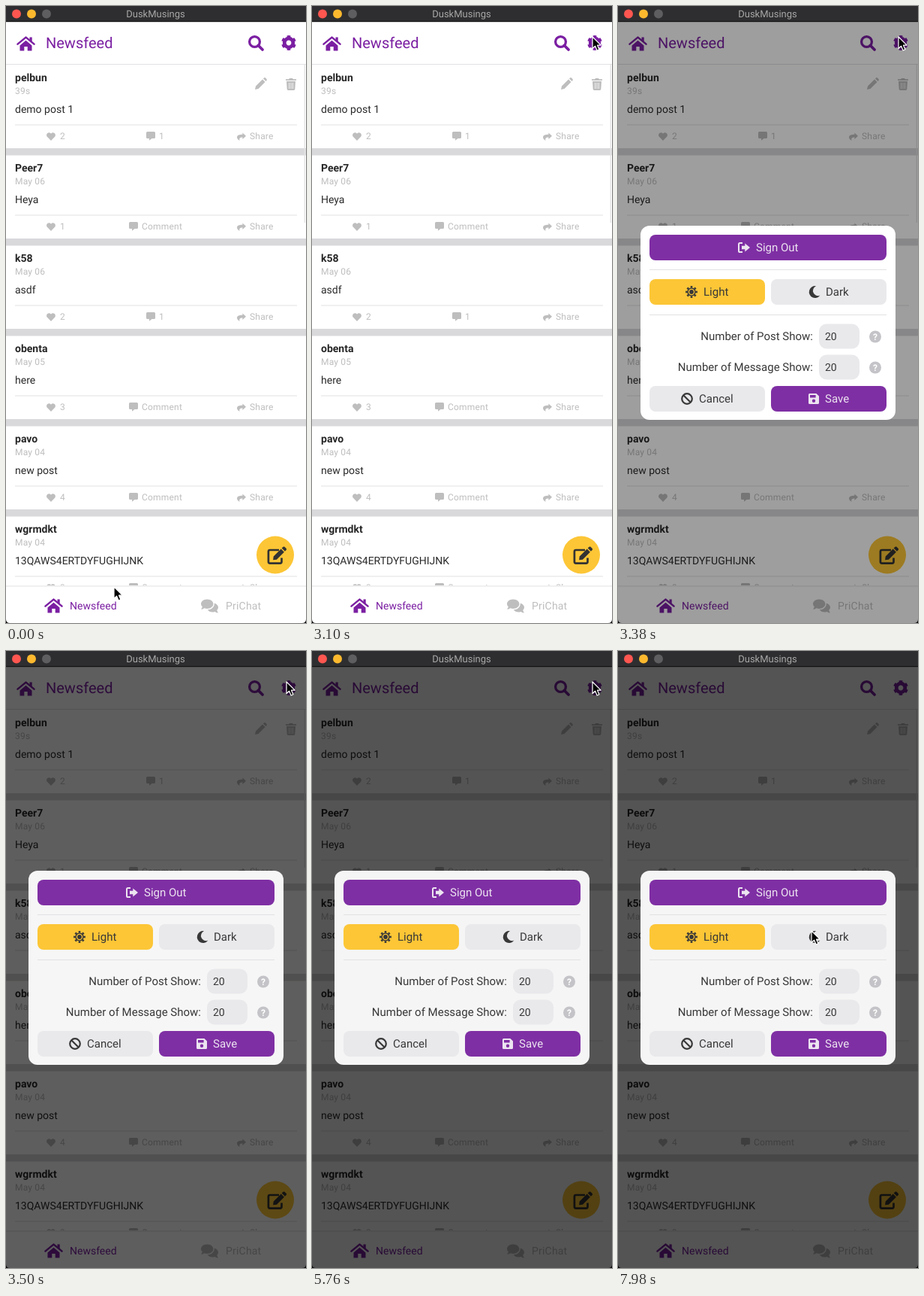
Animation of 400x820 px, one loop 8000 ms. Source, as an HTML page:

```html
<!DOCTYPE html>
<html lang="en">
<head>
<meta charset="utf-8">
<title>Newsfeed</title>
<style>
  html, body { margin: 0; width: 100%; height: 100%; overflow: hidden; background: #000; }
  svg { display: block; font-family: Roboto, sans-serif; }
  text { white-space: pre; text-rendering: geometricPrecision; }
  .line { stroke: #e2e2e4; stroke-width: 1.2; }
  .faint { fill: #bebebe; color: #bebebe; font-size: 12px; letter-spacing: .2px; }
  .body { fill: #2a2a2a; font-size: 14px; }
  .name { fill: #262626; font-size: 14px; font-weight: 700; }
  .accent { fill: #7b1fa2; color: #7b1fa2; }
  .dialog { font-size: 15px; fill: #383838; color: #383838; }
  .light { fill: #ece4f0; color: #ece4f0; }
</style>
</head>
<body>
<svg id="stage" width="400" height="820" viewBox="0 0 400 820"></svg>
<script>
const LOOP = 8000;
const PURPLE = '#7f2fa4', AMBER = '#fcc636', BUTTON = '#e9e9ec';

// Icons are drawn around or from their own origin; currentColor is used for strokes.
const stroke = (d, w, extra = '') =>
  `<path d="${d}" fill="none" stroke="currentColor" stroke-width="${w}" ${extra}/>`;
const ring = (r, w, extra = '') =>
  `<circle r="${r}" fill="none" stroke="currentColor" stroke-width="${w}" ${extra}/>`;
const teeth = (n, r, w, turn = 0) =>
  ring(r, w, `pathLength="${2 * n}" stroke-dasharray="1 1" stroke-dashoffset=".5" transform="rotate(${turn})"`);

const icons = {
  home: stroke('M1 10.6 12 1.6 23 10.6', 2.5, 'stroke-linejoin="round" stroke-linecap="round"') +
    '<path d="M17 1.6h3.2v6L17 5zM4 12.4 12 5.8 20 12.4V19.6H14.2V14H9.8V19.6H4Z"/>',
  search: ring(6.9, 3.3) + stroke('M5 5 10.5 10.5', 3.8, 'stroke-linecap="round"'),
  gear: ring(5.8, 4.8) + teeth(6, 8.5, 2.9, 30),
  pencil: '<path d="M0 16 1 11.5 10 2.5 13.5 6 4.5 15ZM11 1.5 12 .5Q13 -.3 14 .6L15.4 2Q16.3 3 15.5 4L14.5 5Z"/>',
  trash: '<path d="M0 1.2H4.2L5 0H9L9.8 1.2H14V3H0ZM1 4H13L12.3 14.6Q12.2 16 10.8 16H3.2Q1.8 16 1.7 14.6Z"/>' +
    '<path d="M4.6 6V14M7 6V14M9.4 6V14" stroke="#fff" stroke-width=".8"/>',
  heart: '<path d="M6 11 .9 5.8C-.6 4 0 .9 2.6.4 4 .1 5.2.7 6 1.7 6.8.7 8 .1 9.4.4 12 .9 12.6 4 11.1 5.8Z"/>',
  bubble: '<path d="M1.5 0H10.5Q12 0 12 1.5V7.5Q12 9 10.5 9H7.5L4 11.8V9H1.5Q0 9 0 7.5V1.5Q0 0 1.5 0Z"/>',
  share: '<path d="M7.4 0 12 4.2 7.4 8.4V6C4 6 2.6 7.2 3.6 10.6 1.4 9.5 0 7.8 0 6.1 0 3.2 3 2.4 7.4 2.3Z"/>',
  edit: stroke('M15.5 5H3.4Q1.4 5 1.4 7V20.6Q1.4 22.6 3.4 22.6H17Q19 22.6 19 20.6V15.5', 2.7) +
    '<path d="M7.6 18.2 8.2 13.6 18.2 3.6 22.4 7.8 12.4 17.8ZM19.2 2.6 21 .8Q22 0 23 .8L25.2 3Q26 4 25.2 5L23.4 6.8Z"/>',
  chats: '<path d="M8.2 0C12.8 0 16.4 2.8 16.4 6.2S12.8 12.4 8.2 12.4Q6.2 12.4 4.4 11.7 2.6 13.2 0 13.2 1.5 11.6 1.8 9.8 0 8.3 0 6.2C0 2.8 3.6 0 8.2 0Z"/>' +
    '<path d="M17.7 5.2C21 6 23 8.2 23 10.8Q23 13 21.3 14.6 21.6 16.4 23 18 20.4 18 18.6 16.5C14.6 18 10.4 16.6 8.6 13.8 14 13.8 18.4 10 17.7 5.2Z"/>',
  exit: stroke('M6 1H2.6Q1 1 1 2.6V11.4Q1 13 2.6 13H6', 2) +
    '<path d="M5 4.8H9.3V1.6L16 7 9.3 12.4V9.2H5Z"/>',
  sun: teeth(8, 6.7, 2.4) + ring(5, 1.6) + '<circle r="2.9"/>',
  moon: '<path d="M2 -7.8A8 8 0 1 0 7.4 4.6 6.6 6.6 0 0 1 2 -7.8Z"/>',
  ban: ring(6.8, 2.2) + stroke('M-4.8 -4.8 4.8 4.8', 2.2),
  disk: '<path fill-rule="evenodd" d="M1.5 0H10.4L14 3.6V12.5Q14 14 12.5 14H1.5Q0 14 0 12.5V1.5Q0 0 1.5 0ZM2 2V5.4H9.6V2ZM7 7.6A2.2 2.2 0 1 0 7 12 2.2 2.2 0 1 0 7 7.6Z"/>',
};

const icon = (name, x, y, cls = '') => `<g class="${cls}" transform="translate(${x} ${y})">${icons[name]}</g>`;
const text = (x, y, str, cls = '', attrs = '') => `<text x="${x}" y="${y}" class="${cls}" ${attrs}>${str}</text>`;
const rect = (x, y, w, h, fill, r = 0, attrs = '') =>
  `<rect x="${x}" y="${y}" width="${w}" height="${h}" rx="${r}" fill="${fill}" ${attrs}/>`;
const hline = (x1, x2, y) => `<path class="line" d="M${x1} ${y}H${x2}"/>`;

const posts = [
  ['pelbun', '39s', 'demo post 1', 2, 1],
  ['Peer7', 'May 06', 'Heya', 1],
  ['k58', 'May 06', 'asdf', 2, 1],
  ['obenta', 'May 05', 'here', 3],
  ['pavo', 'May 04', 'new post', 4],
  ['wgrmdkt', 'May 04', '13QAWS4ERTDYFUGHIJNK', 3],
];

function card([name, date, body, likes, comments], i) {
  const commentX = comments ? 187 : 164;
  return `<g transform="translate(0 ${78 + i * 120})">` +
    text(12, 22, name, 'name') + text(12, 39, date, 'faint') + text(12, 64, body, 'body') +
    hline(12, 388, 80) +
    `<g class="faint">` +
    icon('heart', 54, 90) + text(72, 99, likes) +
    icon('bubble', commentX, 89) + text(commentX + 17, 99, comments || 'Comment') +
    icon('share', 308, 90.5) + text(325, 99, 'Share') + '</g>' +
    rect(0, 111, 400, 9.5, '#d9d9dc') + '</g>';
}

const page =
  rect(0, 21, 400, 799, '#fff') +
  posts.map(card).join('') +
  icon('pencil', 332, 95, 'faint') + icon('trash', 373, 96, 'faint') +
  rect(397.6, 78, 1.4, 210, '#e4e4e4') +
  icon('home', 14.5, 40, 'accent') + text(53, 56, 'Newsfeed', 'accent', 'font-size="20"') +
  icon('search', 331.5, 47.5, 'accent') + icon('gear', 377, 49, 'accent') +
  hline(0, 400, 77.5) +
  `<circle cx="359" cy="729.5" r="25" fill="${AMBER}"/>` +
  `<g style="fill:#333;color:#333">${icon('edit', 348.5, 718)}</g>` +
  rect(0, 770, 400, 50, '#fff') + hline(0, 400, 771) +
  icon('home', 51.5, 787, 'accent') + text(85, 802, 'Newsfeed', 'accent', 'font-size="14"') +
  icon('chats', 260, 788.5, 'faint') + text(293, 802, 'PriChat', 'faint', 'style="font-size:14px"');

const field = (label, y) =>
  text(260, y + 5, label, '', 'text-anchor="end"') +
  rect(268, y - 16.5, 54, 33, BUTTON, 10) + text(276, y + 5, '20', '', 'font-size="14"') +
  `<circle cx="343" cy="${y + .5}" r="8" fill="#c4c4c8"/>` +
  text(343, y + 5, '?', '', 'text-anchor="middle" font-size="12" font-weight="700" style="fill:#fff"');

const dialog =
  rect(30, 292, 340, 258, '#f5f5f5', 12, 'id="panel"') +
  rect(42, 304, 316, 34, PURPLE, 8) +
  `<g class="light">${icon('exit', 160, 314)}${text(184, 326, 'Sign Out')}</g>` +
  hline(42, 358, 350.5) +
  rect(42, 363, 154, 34, AMBER, 8) + icon('sun', 98, 380) + text(114, 385, 'Light') +
  rect(204, 363, 154, 34, BUTTON, 8) + icon('moon', 262, 380) + text(277, 385, 'Dark') +
  hline(42, 358, 410.5) +
  field('Number of Post Show:', 439) + field('Number of Message Show:', 480) +
  rect(42, 505, 154, 34, BUTTON, 8) + icon('ban', 92, 522) + text(108, 527, 'Cancel') +
  rect(204, 505, 154, 34, PURPLE, 8) +
  `<g class="light">${icon('disk', 254, 515)}${text(276, 527, 'Save')}</g>`;

const titleBar =
  rect(0, 0, 400, 21, '#2e2e30') + rect(0, 20, 400, 1.2, '#121212') +
  [['#ff5650', 14], ['#fdb92e', 34], ['#5e5e60', 54]]
    .map(([c, x]) => `<circle cx="${x}" cy="10.5" r="6" fill="${c}"/>`).join('') +
  text(199.5, 15, 'DuskMusings', '', 'text-anchor="middle" font-size="13" fill="#a8a8a8"');

const corners = '<path d="M0 815V820H5Q0 820 0 815ZM400 815V820H395Q400 820 400 815Z"/>';
const pointer = '<path id="pointer" d="M0 0V15.5L3.6 12.2 6.1 18 8.9 16.8 6.5 11.2H11.2Z" ' +
  'fill="#000" stroke="#fff" stroke-width="1.2" stroke-linejoin="round"/>';

document.getElementById('stage').innerHTML =
  page + rect(0, 21, 400, 799, '#000', 0, 'id="shade"') + titleBar + corners +
  `<g id="dialog" class="dialog">${dialog}</g>` + pointer;

// Each step is [time in ms, value, easing]; the value holds before the first and after the last.
function play(id, property, steps) {
  const all = [[0, steps[0][1]], ...steps, [LOOP, steps.at(-1)[1]]];
  document.getElementById(id).animate(
    all.map(([t, value, easing = 'linear']) => ({ offset: t / LOOP, [property]: value, easing })),
    { duration: LOOP, iterations: Infinity });
}

const at = (x, y) => `translate(${x}px, ${y}px)`;
play('pointer', 'transform', [
  [20, at(144, 772)], [820, at(264, 386)], [1280, at(340, 139), 'ease-out'],
  [1960, at(374, 41)], [6150, at(374, 41), 'ease-in-out'], [7900, at(258, 372)],
]);
play('shade', 'opacity', [[3200, 0], [3520, .67]]);
play('dialog', 'opacity', [[3200, 0, 'ease-out'], [3380, 1]]);
play('panel', 'fill', [[3380, '#ffffff'], [3520, '#f5f5f5']]);
</script>
</body>
</html>
```
